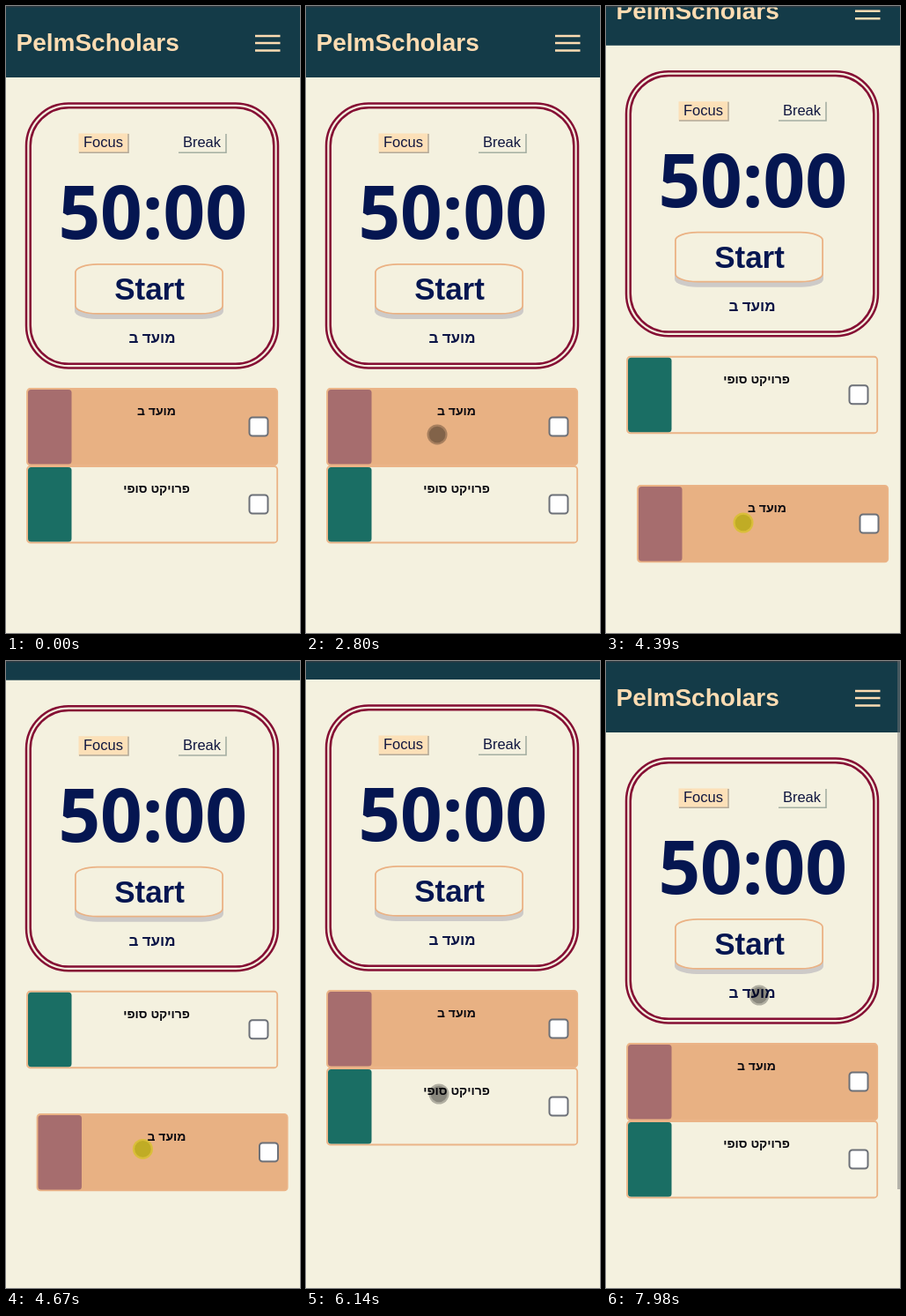
An HTML page for the animation above (8000 ms loop, 334 by 711 pixels).

```html
<!DOCTYPE html>
<html lang="he">
<head>
<meta charset="utf-8">
<title>Study timer</title>
<style>
  html, body { margin: 0; width: 100%; height: 100%; overflow: hidden; background: #f4f1df; }
  svg { display: block; width: 334px; height: 711px; font-family: "Liberation Sans", Arial, sans-serif; }
  .mid { text-anchor: middle; }
  .title { font-size: 28px; font-weight: bold; fill: #fddcb2; }
  .tab { font-size: 16.5px; fill: #10163f; }
  .clock { font: bold 83.5px "Open Sans", "Noto Sans", sans-serif; fill: #051651; }
  .start { font-size: 35px; font-weight: bold; fill: #051651; }
  .label { font: 600 17px "Open Sans", "Liberation Sans", sans-serif; fill: #0a1446; }
  .task { font-size: 14px; font-weight: bold; fill: #08080f; }
  .frame { fill: none; stroke: #850f34; stroke-width: 2.5; }
  .edge { fill: none; stroke-width: 1.6; }
  .check { fill: #fff; stroke: #6c7078; stroke-width: 2; }
</style>
</head>
<body>
<svg viewBox="0 0 334 711">
  <rect width="334" height="711" fill="#f4f1df"/>
  <g id="page">
    <rect width="334" height="81" fill="#143b48"/>
    <text class="title" x="11.5" y="51">PelmScholars</text>
    <path d="M283 34h28.500M283 42h28.500M283 50.500h28.500" stroke="#fddcb2" stroke-width="2.4"/>

    <rect class="frame" x="23" y="110.500" width="286" height="300" rx="48"/>
    <rect class="frame" x="27.700" y="115.200" width="276.600" height="290.600" rx="43.500"/>

    <rect x="82.500" y="144.500" width="57" height="22" fill="#fce0b8"/>
    <path class="edge" d="M139 145v21.200h-56" stroke="#b3aa9a"/>
    <text class="tab mid" x="110.500" y="160">Focus</text>
    <path class="edge" d="M250 145v21.200h-54" stroke="#a5afa2"/>
    <text class="tab mid" x="222.500" y="160">Break</text>

    <text class="clock mid" x="166.700" y="264">50:00</text>

    <rect x="78" y="298" width="169" height="57" rx="25" ry="9" fill="#cdcac8"/>
    <rect x="78.900" y="292.900" width="167.200" height="56" rx="25" ry="9" fill="#f4f1df" stroke="#ebb284" stroke-width="1.8"/>
    <text class="start mid" x="163" y="333">Start</text>
    <text class="label mid" x="166" y="382">מועד ב</text>

    <g id="second"></g>
    <g id="first"></g>
  </g>
  <rect width="334" height="1.500" fill="#2c3a42"/>
  <rect id="bar" x="331" width="3" height="599" fill="#777" opacity=".5"/>
  <g id="dot">
    <circle id="halo" r="11.500"/>
    <circle id="core" r="9.300"/>
  </g>
</svg>
<script>
const LOOP = 8000, LEFT = 23, TOP = 433, PITCH = 88;
const APPEAR = 210, GRAB = 3100, RELEASE = 5960, WHEEL = 7400;
const $ = id => document.getElementById(id);

const ramp = (t, from, to) => Math.min(1, Math.max(0, (t - from) / (to - from)));
const glide = (t, from, to) => (1 - Math.cos(Math.PI * ramp(t, from, to))) / 2;

// The pointer rests between its moves
const entry = { x: 304, y: 695 };
const moves = [
  { from: APPEAR, to: 1000, x: 207, y: 504 },
  { from: 1000, to: 1500, x: 194, y: 483 },
  { from: 1500, to: 2280, x: 187, y: 561 },
  { from: 2280, to: 2950, x: 144, y: 476 },
  { from: 3260, to: 4390, x: 156, y: 586 },
  { from: 4390, to: 5370, x: 153, y: 414 },
  { from: 5720, to: 5840, x: 152, y: 352 },
  { from: 5840, to: 6140, x: 151, y: 491 },
  { from: 6140, to: 6880, x: 157, y: 409 },
  { from: 7380, to: 7980, x: 174, y: 379 }
];

function pointerAt(t) {
  return moves.reduce((p, m) => {
    const k = glide(t, m.from, m.to);
    return { x: p.x + (m.x - p.x) * k, y: p.y + (m.y - p.y) * k };
  }, entry);
}

const grip = pointerAt(GRAB);

// The card trails the pointer slightly, then glides home once released
function dragAt(t, scroll) {
  if (t < GRAB) return { x: 0, y: 0 };
  const p = pointerAt(t - 12);
  const hold = 1 - glide(t, RELEASE, RELEASE + 140);
  return { x: (p.x - grip.x) * hold, y: (p.y - grip.y + scroll) * hold };
}

function fillCard(id, text, fill, stripe) {
  $(id).innerHTML = `
    <rect x="1" y="1" width="284.200" height="86.500" rx="3.500" fill="${fill}" stroke="#ebb487" stroke-width="1.8"/>
    <rect x="2" y="2" width="49.500" height="84.500" rx="3.500" fill="${stripe}"/>
    <text class="task mid" x="148" y="31">${text}</text>
    <rect class="check" x="253.500" y="33.500" width="21" height="21" rx="3.500"/>`;
}

const move = (id, x, y) => $(id).setAttribute('transform', `translate(${x} ${y})`);
const show = (id, on) => { $(id).style.display = on ? '' : 'none'; };

function draw(t) {
  const scroll = 60 * (ramp(t, 3950, 4680) - ramp(t, WHEEL, WHEEL + 380));
  const pointer = pointerAt(t);
  const drag = dragAt(t, scroll);
  const swapped = ramp(t, 3620, 3820) - ramp(t, 5040, 5190);
  const pressed = t >= GRAB && t < RELEASE;

  move('page', 0, -scroll);
  move('first', LEFT + drag.x, TOP + drag.y);
  move('second', LEFT, TOP + PITCH * (1 - swapped));
  move('dot', pointer.x, pointer.y);
  show('dot', t >= APPEAR);
  $('halo').setAttribute('fill', pressed ? 'rgba(216,192,50,.9)' : 'rgba(0,0,0,.28)');
  $('core').setAttribute('fill', pressed ? 'rgba(188,170,36,.9)' : 'rgba(0,0,0,.22)');
  show('bar', t >= WHEEL);
  $('bar').setAttribute('y', scroll * 711 / 844);
}

fillCard('first', 'מועד ב', '#e8b183', '#a66d6e');
fillCard('second', 'פרויקט סופי', '#f4f1df', '#1a6e64');

function tick() {
  draw(performance.now() % LOOP);
  requestAnimationFrame(tick);
}
tick();
</script>
</body>
</html>
```
